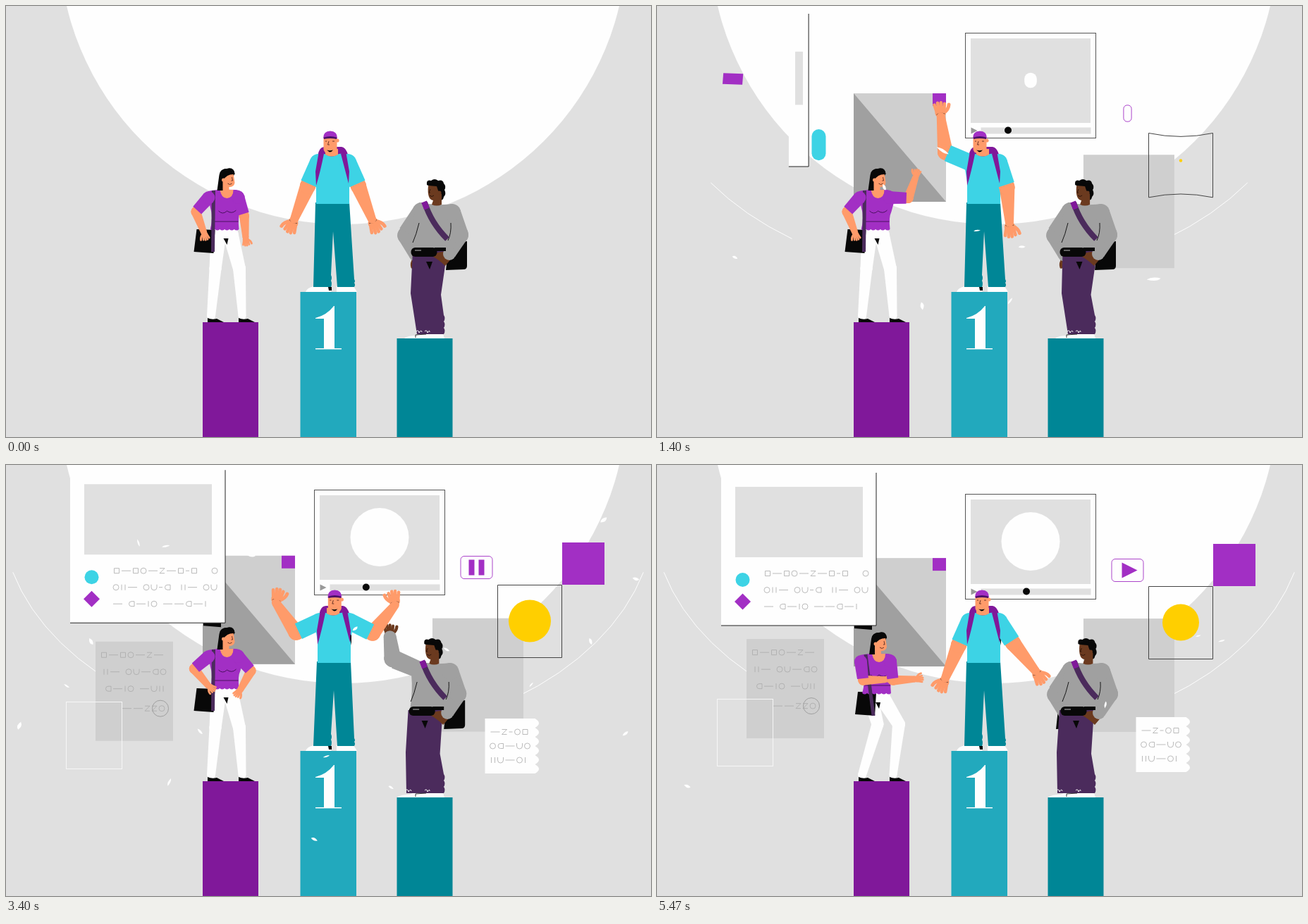
Recreate the animation shown at these times as an HTML page with a canvas. Size 915 px wide and 612 px high, loop 5.54 s.

```html
<!DOCTYPE html>
<html lang="en">
<head>
<meta charset="utf-8">
<title>Podium</title>
<style>
html, body { margin: 0; width: 100%; height: 100%; overflow: hidden; background: #e0e0e0; }
canvas { display: block; width: 915px; height: 612px; }
</style>
</head>
<body>
<canvas id="stage" width="915" height="612"></canvas>
<script>
const c = document.getElementById('stage').getContext('2d');
const LOOP = 5540, STEP = 200 / 3;
const WHITE = '#fefefe', PALE = '#e0e0e0', LIGHT = '#cfcfcf', MID = '#a0a0a0', INK = '#080808';
const PURPLE = '#a22fc4', VIOLET = '#80189a', PLUM = '#4b2b5c', CYAN = '#3dd3e5', TEAL = '#008696';
const SKIN = '#ff9b6a', BROWN = '#6b3a1f', YELLOW = '#ffcf00';
let T = 0;

// ---- timing
const clamp = p => Math.max(0, Math.min(1, p));
const lerp = (a, b, p) => a + (b - a) * p;
const ramp = (from, to) => { const p = clamp((T - from) / (to - from)); return p * p * (3 - 2 * p); };
const hold = (a, b, y, z) => ramp(a, b) - ramp(y, z);
// key(time, value, time, value, ...) with eased steps
function key(t, v, ...rest) {
  for (; rest.length; rest = rest.slice(2)) {
    v = lerp(v, rest[1], ramp(t, rest[0]));
    t = rest[0];
  }
  return v;
}
function bob(mean, a, b) {
  const w = (T - 1400) / 2635 * 2 * Math.PI;
  return mean + a * Math.cos(w) + b * Math.sin(w);
}
const dip = () => hold(3500, 3950, 4060, 4600);

// ---- drawing helpers
function fill(color, d) { c.fillStyle = color; c.fill(new Path2D(d)); }
function line(color, width, d) { c.strokeStyle = color; c.lineWidth = width; c.stroke(new Path2D(d)); }
function rect(color, x, y, w, h) { c.fillStyle = color; c.fillRect(x, y, w, h); }
function frame(color, x, y, w, h) { c.strokeStyle = color; c.lineWidth = 1; c.strokeRect(x, y, w, h); }
function disc(color, x, y, r) { c.fillStyle = color; c.beginPath(); c.arc(x, y, r, 0, 7); c.fill(); }
function pill(color, x, y, w, h, r) {
  c.fillStyle = color; c.beginPath(); c.roundRect(x - w / 2, y - h / 2, w, h, r); c.fill();
}
function at(x, y, draw) { c.save(); c.translate(x, y); draw(); c.restore(); }

function limb(color, x0, y0, r0, x1, y1, r1, roundEnd = true) {
  const a = Math.atan2(y1 - y0, x1 - x0) + Math.PI / 2, u = Math.cos(a), v = Math.sin(a);
  c.fillStyle = color;
  c.beginPath();
  c.moveTo(x0 + u * r0, y0 + v * r0);
  c.lineTo(x1 + u * r1, y1 + v * r1);
  c.lineTo(x1 - u * r1, y1 - v * r1);
  c.lineTo(x0 - u * r0, y0 - v * r0);
  c.fill();
  disc(color, x0, y0, r0);
  if (roundEnd) disc(color, x1, y1, r1);
}

function hand(color, x, y, angle, scale) {
  at(x, y, () => {
    c.rotate(angle);
    c.scale(scale, -scale);
    c.lineCap = 'round';
    disc(color, 5, 0, 7);
    for (const i of [-1.5, -.5, .5, 1.5]) line(color, 4.2, `M6,${i * 3}L${18 - i * i},${i * 4.4}`);
    line(color, 4.5, 'M4,4Q8,11 14,12');
    line('#33201a', .8, 'M3,-5Q6,-1 3,5');
  });
}

// ---- arms: each gesture is upper arm angle, forearm angle, bend of the hand
const GESTURES = {
  open: [66, 68, 0], wide: [57, 51, 10], down: [72, 86, 0], raise: [-23, -83, 0], flex: [12, -96, -60],
  wave: [2, -71, 0], reach: [82, -3, 0], bag: [48, 111, 0], hip: [40, 130, 15], front: [97, 182, 15], rest: [58, 116, 0]
};
const POSE_STARTS = [0, 400, 1270, 2050, 2750, 3600, 5100];
function gesture(names) {
  const list = names.split(' ').map(n => GESTURES[n]);
  const next = POSE_STARTS.findIndex(start => T < start);
  if (next < 0) return list[6];
  const p = ramp(Math.max(POSE_STARTS[next - 1], POSE_STARTS[next] - 620), POSE_STARTS[next]);
  return list[next].map((v, i) => lerp(list[next - 1][i], v, p));
}
// side 1 points to the right, -1 mirrors the arm
function arm(names, x, y, side, o) {
  const [up, fore, bend] = gesture(names).map(d => d * Math.PI / 180);
  const ex = o.upper * Math.cos(up), ey = o.upper * Math.sin(up);
  const wx = ex + o.fore * Math.cos(fore), wy = ey + o.fore * Math.sin(fore);
  at(x, y, () => {
    c.scale(side, 1);
    hand(o.skin, wx, wy, fore + bend, o.hand);
    limb(o.sleeve || o.skin, ex, ey, o.elbow, wx, wy, o.wrist);
    limb(o.sleeve || o.skin, ex * .7, ey * .7, o.elbow, ex, ey, o.elbow);
    limb(o.cloth, 0, 0, o.shoulder, ex * .9, ey * .9, o.elbow + 1, false);
  });
}

// ---- symbol writing
const WIDTHS = { s: 8, o: 8, '-': 13, '.': 5, l: 2, z: 7, u: 8, d: 8, ' ': 3 };
const SHAPES = {
  s: 'M.5,-3.500h7v7h-7z', o: 'M0,0a4,4 0 1 0 8,0a4,4 0 1 0 -8,0', '-': 'M0,0h13', '.': 'M0,0h5', l: 'M1,-4v8',
  z: 'M0,-3.500h7l-7,7h7', u: 'M0,-4v4a4,4 0 0 0 8,0v-4', d: 'M8,-3.500h-4a3.500,3.500 0 0 0 0,7h4z', ' ': ''
};
function symbols(text, x, y, start) {
  for (const ch of text.slice(0, Math.max(0, Math.floor((T - start) / 40)))) {
    at(x, y, () => line('#aaa', .8, SHAPES[ch]));
    x += WIDTHS[ch] + 3;
  }
}

// ---- background pieces
function slideIn(start, x, y, dx, dy, shear, draw) {
  if (T < start) return;
  const q = (1 - clamp((T - start) / 700)) ** 2;
  at(x + dx * q, y + dy * q, () => { c.transform(1, 0, shear * q, 1 + .2 * q, 0, 0); draw(); });
}

function backdrop() {
  rect(PALE, 0, 0, 915, 612);
  disc(WHITE, 478, -92.8, 402.8);
  const sweep = 40 * (1 - (1 - clamp((T - 1000) / 1900)) ** 3), rad = Math.PI / 180;
  if (T > 1000) for (const side of [-1, 1]) {
    c.beginPath();
    c.ellipse(457, 70, 463, 318, 0, (90 - side * 35) * rad, (90 - side * (35 + sweep)) * rad, side > 0);
    c.strokeStyle = WHITE; c.lineWidth = 1; c.stroke();
  }
}

function leftPanels() {
  slideIn(330, 279, bob(128, -4, -1), 56, 526, .97, () => {
    rect(LIGHT, 0, 0, 131, 154);
    fill(MID, 'M0,0L131,154H0z');
    if (T > 900) rect(PURPLE, 112, 0, 19, 18);
  });
  slideIn(1880, 127, bob(250.5, 3.5, 0), 82, 230, 1.1, () => {
    rect(LIGHT, 0, 0, 110, 141);
    symbols('s-so-z-', 8, 19, 2250);
    symbols('ll- ou-do', 11, 43, 2380);
    symbols('d-lo -ull', 14, 67, 2740);
    symbols('--zzo', 38, 95, 3100);
    if (T > 3300) { c.beginPath(); c.arc(92, 95, 11.5, 0, 7); c.strokeStyle = MID; c.lineWidth = 1; c.stroke(); }
  });
  const g = ramp(2350, 2700);
  if (g) frame('#f6f6f6', 85.5, Math.round(bob(336, 4, 0)) + .5, 79 * g, 95 * g);
}

function card() {
  const open = ramp(1270, 1850), image = ramp(1310, 1910), fly = ramp(1300, 1800);
  if (!open) return;
  const w = 220 * open, x = 201 - w / 2;
  const y = key(1400, 11, 1950, 5, 5470, 11);
  if (T > 1700) at(279, y + 217, () => fill(INK, 'M1,0H26V6L1,4z'));
  rect(WHITE, x, y, w, 217);
  line('#222', 1, `M${x},${y + 217}h${w}v-217`);
  const h = lerp(74, 100, image);
  rect(PALE, 201.5 - 90.5 * image, y + lerp(93, 70, image) - h / 2, 181 * image, h);

  pill(CYAN, lerp(242, 121.5, fly), y + lerp(190, 152, fly), 20, lerp(47, 20, fly), 10);
  // a bar that folds into a diamond
  at(lerp(106, 121.5, fly), y + lerp(82, 183, fly), () => {
    const m = (a, b) => lerp(a, b, fly);
    fill(PURPLE, `M${m(-15, 0)},${m(-8, -11.5)}L${m(15, 11.5)},${m(-8, 0)}L${m(15, 0)},${m(8, 11.5)}L${m(-15, -11.5)},${m(8, 0)}z`);
  });
  symbols('s-so-z-s.s   o', 153, y + 143, 1420);
  symbols('oll- ou.d  ll- ou', 152, y + 166.5, 1760);
  symbols('- d-lo --d-l', 152, y + 190, 2100);
}

function video() {
  const s = ramp(850, 1200);
  if (!s) return;
  at(530, Math.round(bob(40, -2, 4.8)) + 75, () => {
    c.scale(s, s);
    c.translate(-92.5, -74.5);
    rect(WHITE, 0, 0, 185, 149);
    frame('#555', 0, 0, 185, 149);
    rect(PALE, 7.5, 7.5, 170, 120);
    rect(PALE, 22, 134, 156, 9);
    fill('#999', 'M8,134L17,138.500L8,143z');
    disc(INK, 60.5 + Math.max(0, T - 1400) * .0064, 138, 5);
    const bloom = ramp(1210, 1850) * (1 - .8 * dip()), w = 83 * bloom;
    pill(WHITE, 92.5, 67 + 16 * dip(), w, w + 5 * (1 - bloom), w / 2);
  });
}

function rightPanels() {
  slideIn(720, 605, bob(214.1, -3.1, -3.7), -60, 420, -.7, () => rect(LIGHT, 0, 0, 129, 161));

  if (T > 1250) {
    const settle = ramp(1350, 1850), rise = key(2800, 168, 4000, 172);
    const top = Math.round(rise + 12 * (1 - settle)) + .5, h = lerp(91, 103, settle), bow = 10 * (1 - settle);
    line('#444', 1, `M697.500,${top}q45.500,${bow} 91,0v${h}q-45.500,${-bow} -91,0z`);
    const size = 60 * ramp(1500, 1950) - 39 * dip();
    rect(PURPLE, 789, rise - size, size, size);
    disc(YELLOW, 743 - 29 * dip(), rise + 51.5 - 10 * dip(),
      (26 + 4 * hold(2100, 2700, 3500, 4000) - 10 * dip()) * ramp(1280, 1950));

    const grow = ramp(1350, 1800);
    at(667.5, key(1400, 152.5, 1950, 142, 2800, 146, 4000, 145, 5470, 149.5), () => {
      pill(WHITE, 0, 0, lerp(10, 45, grow), lerp(23, 32, grow), 5);
      c.strokeStyle = PURPLE; c.lineWidth = .9; c.stroke();
      const s = ramp(1600, 1900);
      c.scale(s, s);
      if (T < 2400 || T > 4700) fill(PURPLE, 'M-8,-11L14,0L-8,11z');
      else if (T < 3400) rect(PURPLE, -12, -12, 24, 24);
      else for (const x of [-11, 3]) rect(PURPLE, x, -11, 8, 22);
    });
  }

  const paper = ramp(2300, 2650);
  if (paper) at(679.5, key(2800, 362, 4000, 358), () => {
    c.save();
    c.scale(paper, 1);
    fill(WHITE, 'M0,0H71' + 'q11,6.500 0,13'.repeat(6) + 'H0z');
    c.restore();
    symbols('-z.os', 8, 19, 2420);
    symbols('od-uo', 7, 39, 2540);
    symbols('llu-ol', 8, 59, 2670);
  });
}

function podiums() {
  rect(VIOLET, 279, 449, 79, 163);
  rect('#22a9bd', 417.5, 406, 79.5, 206);
  rect(TEAL, 554.5, 472, 79, 140);
  fill(WHITE, 'M439,443Q455,439 465,426H466V486H476V487.500H439V486H451V444H439z');
}

// ---- people
const crouch = () => ramp(4500, 5100);

function woman() {
  const low = crouch(), dx = -1.5 + 1.5 * low, dy = 7 * low - 4 * hold(0, 400, 650, 1270);
  const hip = 324 + dy, knee = lerp(373, 368, low), kneeL = lerp(297, 313, low), kneeR = lerp(331, 343, low);
  limb(WHITE, 303 + dx, hip, 11, kneeL, knee, 8.5);
  limb(WHITE, kneeL, knee, 8.5, 291, 440, 6);
  limb(WHITE, 320 + dx, hip, 11, kneeR, knee, 9);
  limb(WHITE, kneeR, knee, 9, 335, 440, 5.5);
  fill(INK, `M${310 + dx},${330 + dy}h7l-2,9z`);
  for (const x of [286, 330]) fill(INK, `M${x},449v-6q6,3 13,1l10,5z`);
  at(dx + 13 * low, 5 * low, () => fill(INK, 'M272,317L298,318L296,351L268,349z'));

  at(dx, dy, () => {
    fill(PURPLE, 'M288,263Q300,260 328,261Q338,262 340,270L334,292Q330,300 332,317' + 'q-3.400,3 -6.800,0'.repeat(6) + 'Q296,300 291,285z');
    fill(SKIN, 'M305,261Q307,273 315,273Q324,272 324,261z');
    line('#4b1260', 1, 'M294,306H331M303,291Q309,297 315,291Q322,296 328,290');
    line(PLUM, 5, `M296,262L${295 + 12 * low},349`);
  });
  const build = { skin: SKIN, cloth: PURPLE, upper: 27, fore: 31, shoulder: 9, elbow: 7, wrist: 4.5, hand: .65 };
  arm('bag bag bag hip hip hip front', 289 + dx, 272 + dy, -1, build);
  arm('down reach wave wave down hip reach', 331 + dx, 272 + dy, 1, build);

  at(314 + dx, dy, () => {
    if (T > 1700 && T < 3300) c.scale(-1, 1);
    c.translate(-314, 0);
    fill(INK, 'M301,262L304,240Q305,231 315,231Q325,229 326,238L314,262z');
    fill(SKIN, 'M309,241L324,238L326,251Q325,257 318,257L318,264H309z');
    fill(INK, 'M304,247Q304,231 315,231Q325,228 326,239Q315,238 310,247z');
    disc(SKIN, 310, 247, 2.5);
    line('#5a2a20', .9, 'M316,252Q319,255 322,252M322,243L323,248H321');
  });
}

function man() {
  const dx = key(0, 0, 470, 3, 1400, -3, 2050, 0, 3000, 0, 4000, -8, 5100, -2), stance = ramp(2250, 2750);
  at(dx - 56 * crouch(), 0, () => fill(INK, 'M628,338L654,334V369Q654,374 649,374L624,375z'));
  arm('rest rest rest rest raise raise rest', 589 + dx, 291, -1,
    { skin: BROWN, sleeve: MID, cloth: MID, upper: 41, fore: 31, shoulder: 12, elbow: 12, wrist: 9, hand: .95 });

  const waist = 577 + dx / 2 - 5 * stance, knee = lerp(574, 567, stance), cuff = lerp(583, 568, stance), toe = lerp(565, 555, stance);
  fill(PLUM, `M${waist},348L${knee},408L${cuff},466H621` + 'q3,-5 0,-9'.repeat(3) + `L${617 + dx / 2},410L${waist + 49},348z`);
  fill(INK, `M${waist + 19},363h9l-4,11z`);
  fill(WHITE, `M${toe},472q4,-4 18,-4l4,-2H620L622,472z`);
  line(INK, .8, 'M581,471V467L596,466');
  line(WHITE, 1, `M${cuff - 1},462q3,-3 4,2q3,-5 4,-1M594,462q3,-3 4,2q3,-5 3,-1`);

  at(dx, 0, () => {
    fill(MID, 'M586,279Q610,284 634,281Q644,300 634,347H576Q580,320 578,300z');
    limb(MID, 633, 293, 12, 644, 325, 12);
    fill(BROWN, 'M604,355Q612,348 622,349L634,356L623,369Q614,360 604,355z');
    limb(MID, 644, 325, 12, 629, 352, 9);
    line(INK, .9, 'M586,308Q582,325 577,336M631,308Q632,322 627,333');
    line(PLUM, 8, 'M594,279Q603,308 626,331');
    line(VIOLET, 8, 'M593,278L597,288');
    pill(INK, 593, 349.5, 37, 13, 6);
    rect(INK, 608, 343, 16, 5);
    line('#eee', .8, 'M580,347h9');
  });
  at(dx * 1.3 + 3 * crouch(), 0, () => {
    fill(INK, 'M597,254Q596,246 603,248Q608,244 613,248Q620,246 621,252Q625,256 622,261Q625,267 621,271Q620,277 615,275L606,258z');
    fill(BROWN, 'M599,255L611,256L613,262L618,267V282Q611,285 604,282L606,276Q597,275 599,255z');
    disc(BROWN, 615, 265, 2.5);
    line('#2a1208', .9, 'M601,269Q604,272 607,269M602,260L600,265H602');
  });
}

function champion() {
  const dx = 2 * hold(1300, 2700, 4480, 5100);
  fill(WHITE, 'M425,406Q427,400 437,398H461V406zM469,406V398H493L498,406z');
  fill(INK, 'M457,399h5v5h-4z');
  fill(TEAL, `M${439 + dx},279H${487 + dx}L494,388q2,3 0,5q2,3 0,6H470L${464 + dx / 2},320L461,382q2,4 0,8q2,4 0,9H436z`);
  at(dx, 0, () => {
    fill(VIOLET, 'M442,225Q441,200 452,200H476Q486,202 487,225z');
    fill(CYAN, 'M434,214Q444,209 452,210Q462,217 472,210Q482,209 492,214L487,250V281H440V250z');
    fill(INK, 'M484,238L488,242V256z');
    fill(SKIN, 'M453,203H471V211Q462,216 453,211z');
  });
  const build = { skin: SKIN, cloth: CYAN, upper: 37, fore: 51, shoulder: 12, elbow: 11, wrist: 6, hand: 1.1 };
  arm('open open raise raise open flex open', 443 + dx, 222, -1, build);
  arm('open down down down down flex wide', 485 + dx, 222, 1, build);
  at(dx, 0, () => fill(VIOLET, 'M444,206L451,210Q446,235 440,255L439,235zM475,210L482,206L487,235L486,252z'));

  at(key(470, -1, 1400, -3, 2050, 3, 4000, 6, 5100, 0), 0, () => {
    pill(SKIN, 461, 196, 19, 26, 6);
    disc(SKIN, 471, 191, 2.6);
    fill(INK, 'M456,204.500Q460,206 465,204.500Q463,207.500 460,207.500z');
    fill(PURPLE, 'M451,188Q451,177.500 461,177.500Q471,177.500 471,188z');
    fill('#4b1268', 'M452,186.500Q461,183.500 470,186.500V189Q461,187 452,189z');
    line('#5a2a20', .9, 'M459,192L457.500,197H460M464,192h3M454,192h2');
  });
}

// ---- drifting petals
let seed = 11;
const random = () => (seed = seed * 16807 % 2147483647) / 2147483647;
const petals = Array.from({ length: 50 }, () => ({
  born: 690 + random() * 4050, x: 15 + random() * 880, y: 10 + random() * 400,
  size: random() < .06 ? 2 : .8 + random() * .4, angle: random() * 6.3, drift: random() - .5
}));
function drawPetals() {
  for (const p of petals) {
    const age = T - p.born;
    if (age < 0 || age > 1300) continue;
    at(p.x + p.drift * age * .05, p.y + age * .1, () => {
      c.rotate(p.angle + age * .002);
      c.scale(p.size, p.size * (.7 + .3 * Math.cos(age * .004)));
      fill(WHITE, 'M-5,0Q-1,-5 5,-1Q2,5 -5,0z');
    });
  }
}

const LAYERS = [backdrop, leftPanels, card, video, rightPanels, podiums, woman, man, champion, drawPetals];
const began = performance.now();
function tick() {
  const now = (performance.now() - began) % LOOP;
  T = Math.min(82, Math.floor((now + 3.4) / STEP)) * STEP;
  for (const layer of LAYERS) layer();
  requestAnimationFrame(tick);
}
tick();
</script>
</body>
</html>
```
